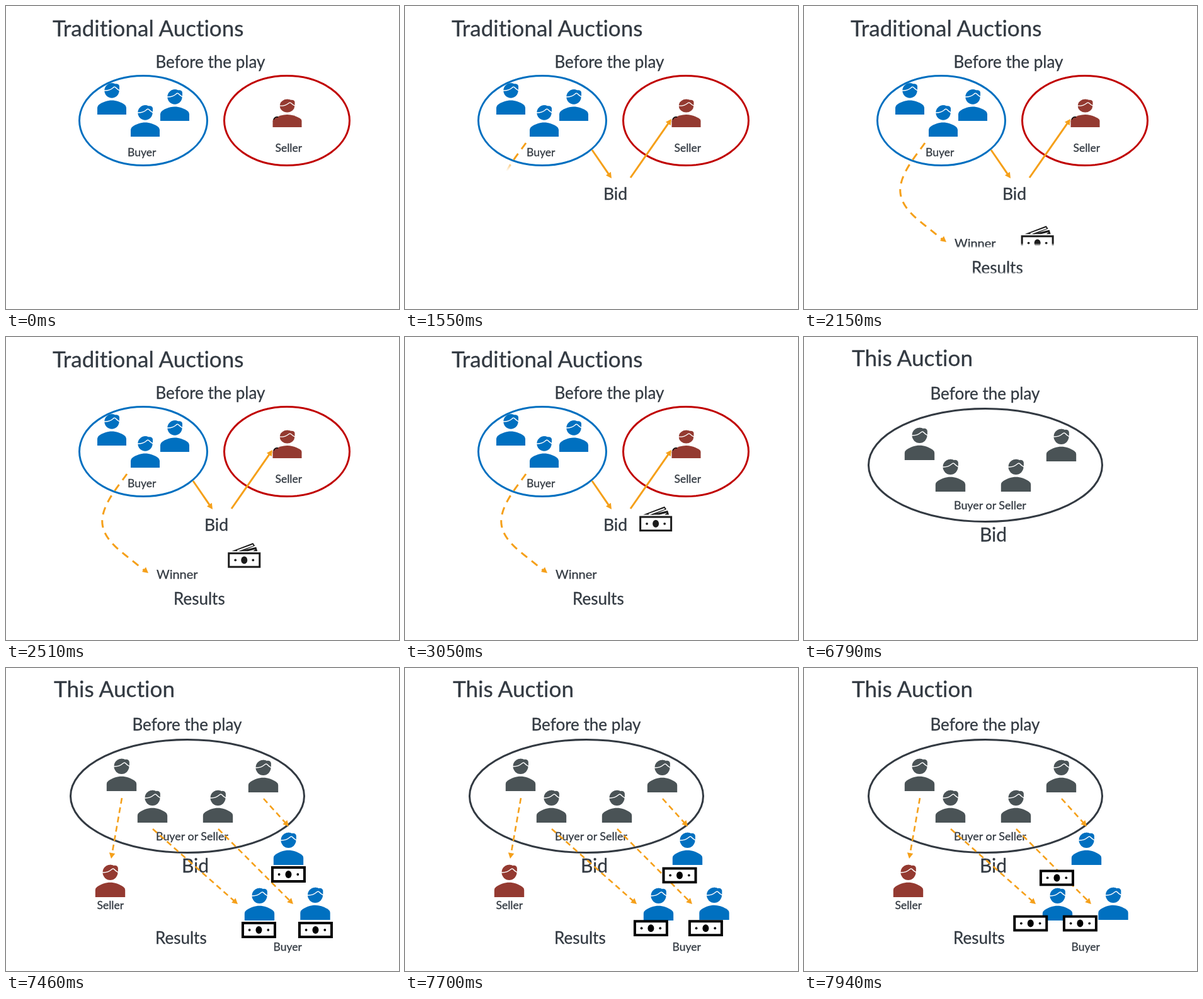
An HTML page for the animation above (8 s loop, 624 px wide and 480 px high).

```html
<!DOCTYPE html>
<html lang="en">
<head>
<meta charset="utf-8">
<title>Auctions</title>
<style>
  html, body { margin: 0; width: 100%; height: 100%; overflow: hidden; background: #fff; }
  svg { display: block; width: 624px; height: 480px; }
  text {
    font-family: Lato, "Open Sans", sans-serif; font-variant-ligatures: none;
    fill: #333a42; stroke: #333a42; stroke-width: .3;
  }
</style>
</head>
<body>
<svg id="stage" viewBox="0 0 624 480"></svg>
<script>
const LOOP = 8000, SWITCH = 6790, STEP = 60, FEATHER = 0.1;
const INK = '#333a42', BLUE = '#0070c0', RED = '#943a31', GREY = '#4a5356', ORANGE = '#f5a01a';

// Each wipe reveals its elements within their own bounding boxes.
const wipes = {
  bid:     { start: 0,    end: 480 },
  offer:   { start: 950,  end: 1430, up: true },
  award:   { start: 1430, end: 1850 },
  results: { start: 1850, end: 2270 },
  outcome: { start: 6860, end: 7340 }
};

const moves = [
  { id: 'payment', from: [343, 353], by: [39, -113], start: 1890, duration: 1800 },
  { id: 'note0', from: [421, 314], by: [-311, 36], start: 7445, duration: 1800 },
  { id: 'note1', from: [374, 402], by: [-276, -69], start: 7445, duration: 1800 },
  { id: 'note2', from: [464, 402], by: [-351, -69], start: 7445, duration: 1800 }
];

const masked = wipe => wipe ? `mask="url(#${wipe})"` : '';

const label = (x, y, size, words, wipe) =>
  `<text x="${x}" y="${y}" font-size="${size}" ${masked(wipe)}>${words}</text>`;

const ring = (cx, cy, rx, ry, color) =>
  `<ellipse cx="${cx}" cy="${cy}" rx="${rx}" ry="${ry}" fill="none" stroke="${color}" stroke-width="3"/>`;

const person = (x, y, color, scale = 1, wipe) => `
  <g transform="translate(${x} ${y}) scale(${scale})"><g fill="${color}" ${masked(wipe)}>
    <path d="M-23 0V-11Q-23-14-20-16C-14-20-7-22.5 0-22.5S14-20 20-16Q23-14 23-11V0Z"/>
    <circle cy="-38" r="11.7"/>
    <path d="M-6-48Q0-51 5-48.5Q11-49.5 12-45V-39H4Z"/>
    <path d="M-12.5-38C-6-37.5-2-39 2-42.5Q4.5-45 6.5-42.5T12.5-38" fill="none" stroke="#fff" stroke-width="1.4"/>
  </g></g>`;

// The shaft follows d; the head points from (x0, y0) towards (x, y).
function arrow(d, [x0, y0], [x, y], wipe, dash = '', width = 3) {
  const angle = Math.atan2(y - y0, x - x0) * 180 / Math.PI;
  return `<g ${masked(wipe)}>
    <path d="${d}" fill="none" stroke="${ORANGE}" stroke-width="${width}" stroke-dasharray="${dash}"/>
    <path d="M0 0L-9-4.8V4.8Z" fill="${ORANGE}" transform="translate(${x} ${y}) rotate(${angle})"/>
  </g>`;
}

function straight(from, to, wipe, dash, width) {
  const length = Math.hypot(to[0] - from[0], to[1] - from[1]);
  const stop = to.map((v, i) => v - (v - from[i]) * 6 / length);
  return arrow(`M${from}L${stop}`, from, to, wipe, dash, width);
}

const bill = (w, h, edge) => `
  <rect x="${edge / 2}" y="${edge / 2}" width="${w - edge}" height="${h - edge}"
    fill="#fff" stroke="currentColor" stroke-width="${edge}"/>
  <g fill="currentColor"><ellipse cx="${w / 2}" cy="${h / 2}" rx="5" ry="6"/>
  <circle cx="${w * 0.23}" cy="${h / 2}" r="1.9"/><circle cx="${w * 0.77}" cy="${h / 2}" r="1.9"/></g>`;

const cash = `<g id="payment" color="#1c1c1c"><g fill="currentColor" ${masked('results')}>
  <path d="M6 13L40 0L43 4.5L22 13Z"/>
  <path d="M15 12.5L40 3.5" stroke="#fff" stroke-width="2.2"/>
  <path d="M18 13L45 6.5L47 13H40L44 10L32 13Z"/>
  <g transform="translate(0 15)">${bill(52, 24.5, 3)}</g>
</g></g>`;

const note = i => `<g id="note${i}"><g ${masked('outcome')}>${bill(55, 26, 4)}</g></g>`;
const link = (from, to) => straight(from, to, 'outcome', '9 6', 2.6);

const definitions = Object.entries(wipes).map(([id, { up }]) => `
  <linearGradient id="${id}Fade" x1="0" x2="0" y1="${up ? 1 : 0}" y2="${up ? 0 : 1}">
    <stop stop-color="#fff"/><stop stop-color="#000"/>
  </linearGradient>
  <mask id="${id}" x="-.5" y="-.1" width="2" height="1.2" maskContentUnits="objectBoundingBox">
    <rect x="-.5" y="-.1" width="2" height="1.2" fill="url(#${id}Fade)"/>
  </mask>`).join('');

const traditional = [
  label(74, 48, 35, 'Traditional Auctions'),
  label(237.5, 98, 26, 'Before the play'),
  ring(218, 181.5, 101.5, 71, BLUE),
  ring(446, 181.5, 99.5, 71, '#c00000'),
  person(168, 172, BLUE), person(268, 182, BLUE), person(221, 207, BLUE),
  person(446.5, 192, RED, '1 .89'),
  '<path d="M425 180Q427 175 432 176" fill="none" stroke="#000" stroke-width="1.5"/>',
  label(193, 238, 17.5, 'Buyer'),
  label(427.5, 231, 17.5, 'Seller'),
  straight([297, 228], [328, 273], 'bid'),
  label(315, 307, 26.5, 'Bid', 'bid'),
  straight([358, 272], [423, 179], 'offer'),
  arrow('M192 217C178 237 150 268 153 296C156 325 188 343 220 370',
    [198, 351], [226, 374], 'award', '12 9'),
  label(239, 383, 20, 'Winner', 'results'),
  label(266, 424, 26, 'Results', 'results'),
  cash
];

const reversible = [
  label(76, 46, 35.2, 'This Auction'),
  label(200.5, 99, 26, 'Before the play'),
  ring(288, 203, 185.5, 89.5, INK),
  person(183.5, 195, GREY, 1.03), person(408.5, 197, GREY, 1.03),
  person(232.5, 245, GREY, 1.03), person(336.5, 245, GREY, 1.03),
  label(238, 273, 17.9, 'Buyer or Seller'),
  label(279, 324, 30, 'Bid'),
  person(165.5, 363, RED, 1.03, 'outcome'),
  person(448.5, 312, BLUE, 1.03, 'outcome'),
  person(402.5, 400, BLUE, 1.03, 'outcome'),
  person(491, 399, BLUE, 1.03, 'outcome'),
  label(144.5, 382, 17.5, 'Seller', 'outcome'),
  label(424.5, 448, 17.5, 'Buyer', 'outcome'),
  label(237, 437, 26, 'Results', 'outcome'),
  link([184, 206], [167, 302]), link([233, 255], [368, 374]),
  link([337, 255], [456, 374]), link([409, 207], [449, 251]),
  note(0), note(1), note(2)
];

const stage = document.getElementById('stage');
stage.innerHTML = `<defs>${definitions}</defs>
  <g id="first">${traditional.join('')}</g><g id="second">${reversible.join('')}</g>`;
const find = id => document.getElementById(id);

const progress = (t, start, end) => Math.min(1, Math.max(0, (t - start) / (end - start)));
const ease = u => u < 0.5 ? 2 * u * u : 1 - 2 * (1 - u) ** 2;

// Motion advances in fixed steps, counted from the start of each burst.
function stepped(t) {
  const base = [6920, SWITCH, 1010, 0].find(b => t >= b);
  return base + Math.floor((t - base) / STEP) * STEP;
}

function draw(now) {
  const time = now % LOOP, t = stepped(time);
  find('first').style.display = time < SWITCH ? '' : 'none';
  find('second').style.display = time < SWITCH ? 'none' : '';
  for (const [id, { start, end }] of Object.entries(wipes)) {
    const edge = progress(t, start, end) * (1 + FEATHER);
    const [solid, clear] = find(id + 'Fade').children;
    solid.setAttribute('offset', Math.max(0, edge - FEATHER));
    clear.setAttribute('offset', Math.min(1, edge));
    clear.setAttribute('stop-color', t >= end ? '#fff' : '#000');
  }
  for (const { id, from, by, start, duration } of moves) {
    const k = ease(progress(t, start, start + duration));
    find(id).setAttribute('transform', `translate(${from[0] + by[0] * k} ${from[1] + by[1] * k})`);
  }
}

const begin = performance.now();
function tick() {
  draw(Math.max(0, performance.now() - begin));
  requestAnimationFrame(tick);
}
tick();
</script>
</body>
</html>
```
